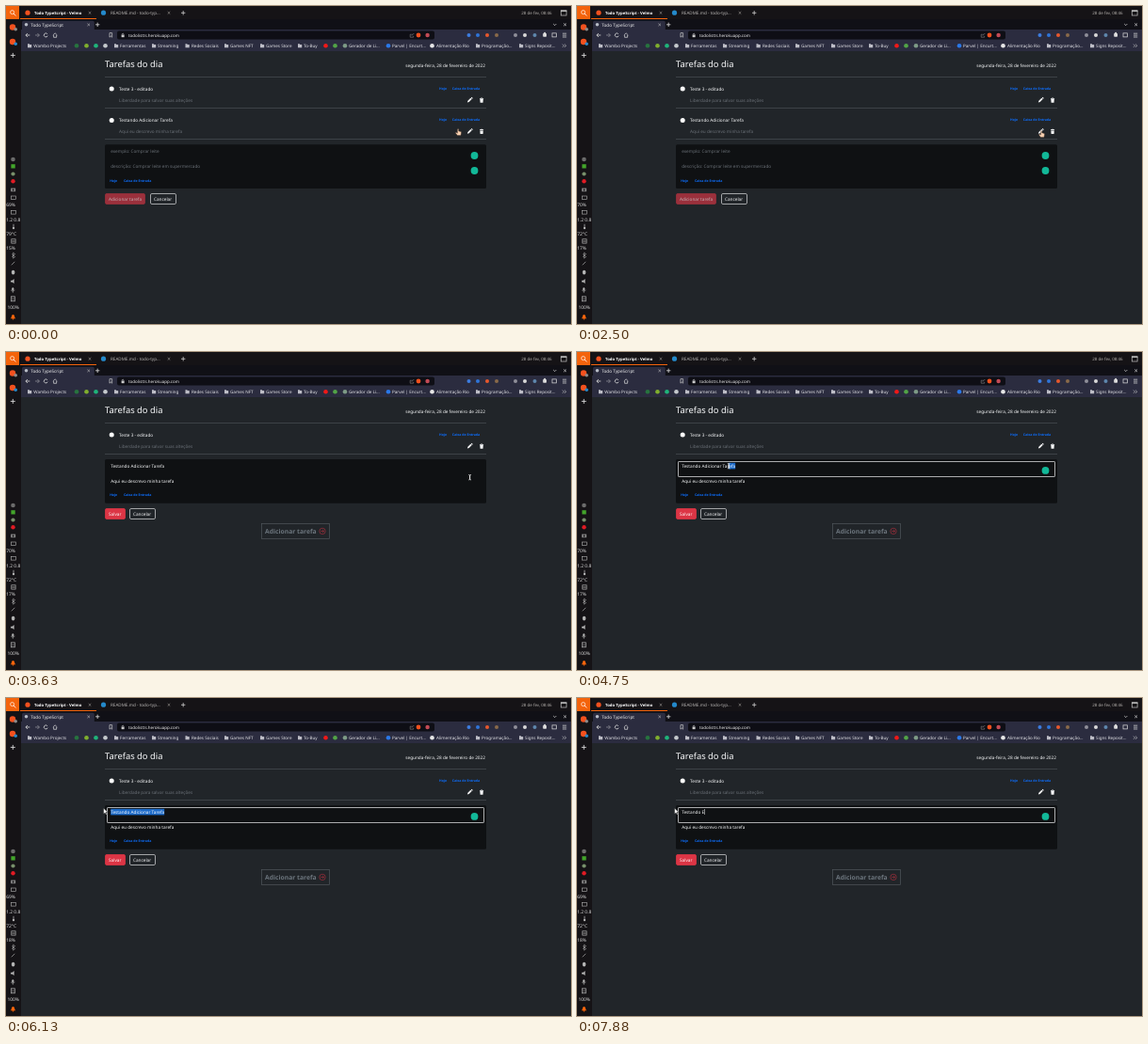
Write an HTML page that moves like this. It is 600x338 px and loops after 8000 ms.

```html
<!DOCTYPE html>
<html lang="pt-BR">
<head>
<meta charset="utf-8">
<title>Tarefas do dia</title>
<style>
  html, body { margin: 0; width: 100%; height: 100%; overflow: hidden; background: #212529; }
  svg { display: block; width: 600px; height: 338px; }
  text { font-family: "Noto Sans", "Open Sans", sans-serif; white-space: pre; text-rendering: geometricPrecision; }
</style>
</head>
<body>
<svg id="stage" viewBox="0 0 600 338"></svg>
<script>
const stage = document.getElementById('stage');
const TICK = 125, TICKS = 64;
const WHITE = '#f8f9fa', MUTED = '#6a7077', BLUE = '#0d6efd', RED = '#dc3545', GREEN = '#12b898';
const ORANGE = '#f4640c', PANEL = '#151316', TOOLBAR = '#2b2c3f', ICON = '#b4b4b4';
let layer = stage;

function add(tag, attrs, parent = layer) {
  const el = document.createElementNS('http://www.w3.org/2000/svg', tag);
  for (const k in attrs) el.setAttribute(k, attrs[k]);
  return parent.appendChild(el);
}
const rect = (x, y, width, height, fill, more = {}) => add('rect', { x, y, width, height, fill, ...more });
const box = (x, y, w, h, stroke, width = .8, more = {}) => rect(x, y, w, h, 'none', { stroke, 'stroke-width': width, ...more });
const dot = (cx, cy, r, fill) => add('circle', { cx, cy, r, fill });
const ring = (cx, cy, r, stroke, w = .7) => add('circle', { cx, cy, r, stroke, 'stroke-width': w, fill: 'none' });
const line = (d, stroke = '#c9c9cf', w = .8) => add('path', { d, stroke, 'stroke-width': w, fill: 'none' });
const shape = (d, fill) => add('path', { d, fill });
function text(x, y, str, size, fill, weight = 400) {
  const el = add('text', { x, y, 'font-size': size, fill, 'font-weight': weight });
  el.textContent = str;
  return el;
}
function group(draw) {
  const outer = layer;
  const g = add('g', {});
  layer = g;
  draw();
  layer = outer;
  return g;
}
const show = (el, on) => el.setAttribute('visibility', on ? 'visible' : 'hidden');
const place = (el, x, y) => el.setAttribute('transform', `translate(${x} ${y})`);

// ---- desktop panel
function topBar() {
  rect(0, 0, 600, 14, PANEL);
  rect(15, 13, 81, 1, ORANGE);
  rect(0, 0, 14, 14, ORANGE);
  ring(6.6, 6.6, 2, '#fff', .7);
  line('M8 8 10.4 10.4', '#fff');
  dot(23, 7.2, 2.6, '#f4511e');
  text(30, 9, 'Todo TypeScript - Velmo', 4.25, '#fff', 700);
  dot(103.5, 7.2, 2.6, '#2489ca');
  text(111, 9, 'README.md - todo-typ...', 4.6, '#b8b5b3');
  for (const x of [89, 173]) line(`M${x - 1.3} 6l2.6 2.6m0-2.6l-2.6 2.6`, '#a8a4a0', .6);
  line('M186 7.3h4.4M188.2 5.1v4.4', '#d0d0d0');
  text(547.3, 9, '28 de fev, 08:46', 4.45, '#b4b0ac');
  box(589.3, 5, 5.8, 5, '#c4c4c4', .7);
  rect(589, 4.5, 6.4, 1.4, '#c4c4c4');
}

const meters = {};
function sideBar() {
  rect(0, 14, 16, 324, PANEL);
  for (const [y, badge] of [[22.5, '#8b8b8b'], [38, '#2489ca']]) {
    dot(7, y, 3.2, '#f4511e');
    dot(10.2, y + 2.3, 1.8, badge);
  }
  line('M4.8 52.4h5M7.3 49.9v5', '#eee');
  dot(7.5, 163, 2.3, '#6c6c6c');
  rect(5.4, 168.2, 4.3, 4.3, '#43a52b');
  dot(7.5, 178.5, 2.1, '#78906c');
  dot(7.5, 186.3, 2.2, '#e01b24');
  rect(5.1, 193.6, 5, 3.6, '#888');
  dot(7.6, 195.4, 1, PANEL);
  for (const y of [203.7, 219.3]) box(5.5, y - 1.7, 4.8, 3.5, ICON, .6);
  line('M8 231.8v3', ICON);
  dot(8, 236, 1.2, ICON);
  box(5.8, 247.8, 4.3, 4.3, ICON, .7);
  line('M6.3 250h3.4', ICON);
  line('M6.2 263.6l3.4 3-2 1.6v-6l2 1.5-3.4 3', ICON, .6);
  line('M5.8 275.3l3.5-3.5', ICON, .7);
  rect(5.9, 280.7, 3.4, 4.8, ICON, { rx: 1.7 });
  shape('M5 291.8h1.6l2-1.7v5l-2-1.7H5z', ICON);
  rect(6.3, 299.2, 2, 3.5, ICON, { rx: 1 });
  line('M5.2 302q2.1 3 4.2 0m-2.1 1.4v1.4', ICON, .6);
  box(5.4, 308.8, 4.2, 5, ICON, .7);
  line('M6.4 310.7h2.2m-2.2 1.5h2.2', ICON, .5);
  const label = (y, s, x = .2) => text(x, y, s, 4.9, '#dcdcdc');
  meters.cpu = label(213, '');
  label(228.6, '1.2 0.8');
  meters.temp = label(243.8, '');
  meters.mem = label(259.3, '');
  label(321.7, '100%', 1.4);
  shape('M4.8 332.2q1.2-1 1.2-3 1.5-2.4 3 0 0 2 1.2 3z', ORANGE);
  dot(7.5, 332.8, .8, ORANGE);
}

// ---- browser frame
function folder(x) {
  shape(`M${x - 2} 40.2h1.7l.6.7h1.9v3.3h-4.2z`, '#bdbdc6');
}
function browser() {
  rect(16, 14, 584, 11, '#101016');
  shape('M17 25V17.5q0-1.8 1.8-1.8H92q1.8 0 1.8 1.8V25z', TOOLBAR);
  dot(21.5, 19.8, 1.8, '#b7bcc6');
  text(26.3, 21.5, 'Todo TypeScript', 4.65, '#eee');
  line('M86.4 18.6l2.6 2.6m0-2.6l-2.6 2.6', '#bbb', .6);
  line('M95 19.8h4.4M97.2 17.6v4.4', '#ddd');
  line('M581.2 19l1.6 1.6 1.6-1.6M592.2 18.4l2.8 2.8m0-2.8l-2.8 2.8', '#ddd', .7);

  rect(16, 25, 584, 23, TOOLBAR);
  rect(118, 26.4, 337, 9.2, '#0e0e15', { rx: 2 });
  line('M25.3 31h-4.4m2-2l-2 2 2 2', '#ddd');
  line('M31 31h4.4m-2-2l2 2-2 2', '#8a8a94', .8);
  line('M43.9 29.7a2 2 0 1 0 .3 2', '#ddd');
  line('M49.8 31l2.3-2.2 2.3 2.2m-3.8 0v2.3h3v-2.3', '#ddd', .7);
  line('M110 28.6h2.6v4.6l-1.3-1.2-1.3 1.2z', '#ccc', .7);
  rect(122.6, 30.6, 3, 2.6, '#ccc');
  line('M123.2 30.6v-.8q.9-1.5 1.8 0v.8', '#ccc', .6);
  text(130, 32.7, 'todolistts.herokuapp.com', 4.48, '#f0f0f0');
  line('M430.8 30.2h-1.6v3h3.4v-1.4m-1.7-.3q.3-2 2.4-2', '#999', .5);
  dot(438, 31, 2.4, '#f4511e');
  dot(447.6, 31, 2.2, '#c24a55');
  const tools = ['#3c7de0', '#2f74d8', '#e8582c', '#8a6a4a', '#8f8f9a', '#d8d8d8', '#5e87ad'];
  [491.5, 501, 511, 521, 541, 551, 561.5].forEach((x, i) => dot(x, 31, 2, tools[i]));
  rect(570.2, 29, 3.8, 3.8, '#ddd', { rx: .8 });
  dot(572.1, 28.7, 1, '#ddd');
  box(580, 28.9, 4.4, 4, '#ddd', .7);
  line('M591 29.2h4.2m-4.2 1.9h4.2m-4.2 1.9h4.2', '#ddd', .7);

  const marks = [
    [25, 0, 29.3, 'Wambo Projects'], [75, '#27733f'], [85.5, '#7fae2e'], [95.5, '#1fb47a'], [105.5, '#c4c8cc'],
    [117, 0, 121, 'Ferramentas'], [157, 0, 161, 'Streaming'], [192.5, 0, 197, 'Redes Sociais'],
    [234, 0, 238, 'Games NFT'], [272, 0, 276, 'Games Store'], [312, 0, 316, 'To-Buy'],
    [339.5, '#f01818'], [349.5, '#52a447'], [360, '#7d9a86', 364, 'Gerador de Li...'],
    [406, '#2a78e8', 410, 'Parvel | Encurt...'], [452.5, '#e6e6e6', 457, 'Alimentação Rio'],
    [501, 0, 505, 'Programação...'], [547, 0, 551, 'Signs Reposit...'],
  ];
  for (const [x, color, tx, name] of marks) {
    color ? dot(x, 42.2, 2.3, color) : folder(x);
    if (name) text(tx, 43.9, name, 4.58, '#e4e4e8');
  }
  line('M591 40.6l1.6 1.6-1.6 1.6m2.2-3.2l1.6 1.6-1.6 1.6', '#ddd', .6);
}

// ---- page parts
const rule = y => rect(105, y, 405, 1, '#3d4247');
function badges(x1, x2, y) {
  text(x1, y, 'Hoje', 3.5, BLUE, 600);
  text(x2, y, 'Caixa de Entrada', 3.5, BLUE, 600);
}
function task(y, title, note) {
  dot(112.2, y, 2.5, '#fff');
  text(120, y + 1.9, title, 4.7, WHITE);
  text(120, y + 13.6, note, 4.7, MUTED);
  badges(460, 473.8, y + .6);
  shape(`M489.9 ${y + 14.4}l.5-1.8 3-3 1.3 1.3-3 3zM493.8 ${y + 9.3}l.7-.7 1.3 1.3-.7.7z`, WHITE);
  shape(`M503 ${y + 9.8}h1.2l.3-.5h1.1l.3.5h1.2v.8H503zM503.3 ${y + 11}h3.5l-.3 3.6h-2.9z`, WHITE);
  rule(Math.round(y + 20));
}
function panel(y) {
  rect(105, y, 405, 46.8, '#0f1113', { rx: 1.5 });
  badges(110.2, 124.9, y + 39.3);
}
function button(x, y, w, label, fill, stroke, color) {
  rect(x + .5, y + .5, w - 1, 11, fill, { rx: 1.4, stroke, 'stroke-width': .8 });
  text(x + 4, y + 7.8, label, 4.7, color);
}
const cancel = (x, y) => button(x, y, 28, 'Cancelar', 'none', '#c4c6c8', WHITE);

rect(0, 0, 600, 338, '#212529');
browser();
topBar();
sideBar();
text(105, 65.3, 'Tarefas do dia', 9.4, WHITE);
text(424.3, 65.2, 'segunda-feira, 28 de fevereiro de 2022', 4.7, WHITE);
rule(75);
task(88.1, 'Teste 3 - editado', 'Liberdade para salvar suas alteções');

const NOTE = 'Aqui eu descrevo minha tarefa';
const addView = group(() => {
  task(121.4, 'Testando Adicionar Tarefa', NOTE);
  panel(147.3);
  text(111.2, 156, 'exemplo: Comprar leite', 4.7, MUTED);
  text(111.2, 172, 'descrição: Comprar leite em supermercado', 4.7, MUTED);
  dot(497.5, 159, 3.9, GREEN);
  dot(497.5, 175, 3.9, GREEN);
  button(105, 199, 43, 'Adicionar tarefa', '#9b303c', '#9b303c', '#c3b0b4');
  cancel(153, 199);
});

let focusRing, selection, field, caret;
const editView = group(() => {
  panel(114);
  focusRing = group(() => {
    box(107.5, 116.5, 400, 16, '#d4d5d6', .8, { rx: .6 });
    dot(497.5, 125.9, 3.9, GREEN);
  });
  selection = rect(111.2, 117.8, 58, 6.6, '#1b6ac9');
  field = text(111.2, 122.6, '', 4.7, WHITE);
  caret = rect(0, 118, .5, 6, '#fff');
  text(111.2, 138.9, NOTE, 4.7, WHITE);
  button(105, 166, 22, 'Salvar', RED, RED, '#fff');
  cancel(131, 166);
  box(271.5, 182.5, 72, 16, '#50565c', .7);
  text(275, 192.9, 'Adicionar tarefa', 6.75, '#6c757d', 600);
  ring(336, 190.4, 3.2, '#b8303e', .6);
  line('M334.2 190.4h3.4m-1.4-1.4l1.4 1.4-1.4 1.4', '#b8303e', .6);
});

// ---- pointers, each with its hot spot at 0,0
const pointers = {
  hand: group(() => add('path', {
    d: 'M-.6 0q.7-.8 1.3 0v2l2.3.6q.6.2.5 1L3 6.6H-.6L-2.6 4q0-.9 1-.6l1 .8z',
    fill: '#f6cfb0', stroke: '#3a2a20', 'stroke-width': .35 })),
  beam: group(() => line('M-1.3-2.7q1.3 0 1.3.6V2.1q0 .6-1.3.6M1.3-2.7Q0-2.7 0-2.1V2.1q0 .6 1.3.6', '#fff', .7)),
  arrow: group(() => add('path', {
    d: 'M0 0V6.2L1.5 4.9 2.5 7 3.5 6.5 2.5 4.5H4.4z',
    fill: '#fff', stroke: '#111', 'stroke-width': .4 })),
};

// ---- motion, times in ticks
const path = [
  [0, 480, 131], [1, 480, 131], [7, 493, 132.8], [27, 493, 132.8], [28, 492.6, 133.2],
  [30, 492.6, 133.2], [35, 178, 121.5], [37, 171, 121.2], [41, 108, 121], [42, 105.7, 118],
  [44, 105.7, 118], [48, 103.6, 117], [64, 103.6, 117],
];
const typing = [
  [0, 'Testando Adicionar Tarefa'], [50, 'T'], [51, 'Te'], [52, 'Tes'], [53, 'Test'],
  [55, 'Testan'], [56, 'Testand'], [57, 'Testando'], [59, 'Testando '], [62, 'Testando E'],
];
const loads = [[0, '69%', '79°C', '15%'], [3, '70%', '72°C', '17%'], [43, '69%', '72°C', '18%']];
const EDIT = 29, FOCUS = 36, TYPE = 50;

const latest = (table, k) => table.filter(row => row[0] <= k).pop();
function pointerAt(k) {
  const i = path.findIndex(p => p[0] > k);
  const [t0, x0, y0] = path[i - 1], [t1, x1, y1] = path[i];
  const u = (k - t0) / (t1 - t0), e = u * u * (3 - 2 * u);
  return [x0 + (x1 - x0) * e, y0 + (y1 - y0) * e];
}

function render(k) {
  const editing = k >= EDIT;
  addView.style.display = editing ? 'none' : '';
  editView.style.display = editing ? '' : 'none';

  const [, cpu, temp, mem] = latest(loads, k);
  meters.cpu.textContent = cpu;
  meters.temp.textContent = temp;
  meters.mem.textContent = mem;

  const [x, y] = pointerAt(k);
  const kind = k < 28 ? 'hand' : k < 42 ? 'beam' : 'arrow';
  for (const name in pointers) show(pointers[name], name === kind);
  place(pointers[kind], x, y);
  if (!editing) return;

  field.textContent = latest(typing, k)[1];
  const end = 111.2 + field.getComputedTextLength();
  show(focusRing, k >= FOCUS);
  const from = Math.min(end, Math.max(111.2, x));
  show(selection, k >= FOCUS && k < TYPE);
  selection.setAttribute('x', from);
  selection.setAttribute('width', end - from);
  show(caret, k >= TYPE);
  caret.setAttribute('x', end + .2);
}

const start = performance.now();
function frame() {
  render(Math.floor((performance.now() - start) / TICK) % TICKS);
  requestAnimationFrame(frame);
}
frame();
</script>
</body>
</html>
```
